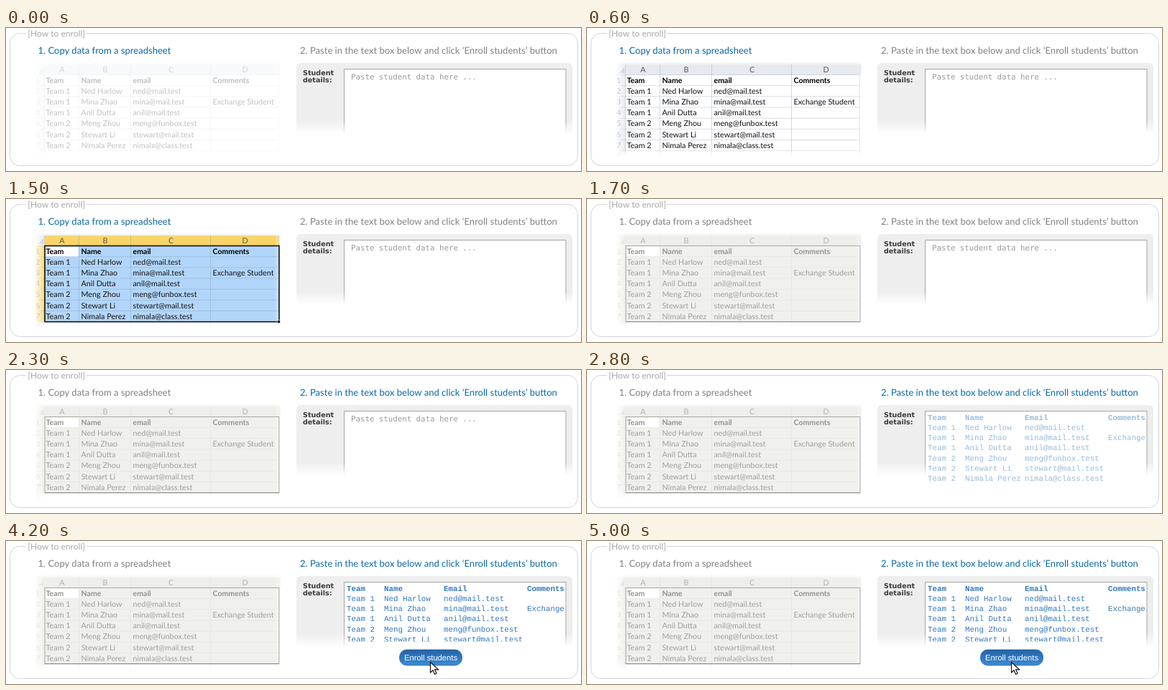
These frames come from a looping animation (800x200 px, 5100 ms). An HTML page:

```html
<!DOCTYPE html>
<html lang="en">
<head>
<meta charset="utf-8">
<title>How to enroll</title>
<style>
html, body { margin: 0; width: 100%; height: 100%; overflow: hidden; background: #fff; }
svg { display: block; width: 100%; height: 100%; }
text { font-family: Lato, Inter, sans-serif; font-size: 10.8px; text-rendering: geometricPrecision; white-space: pre; }
.b { font-weight: bold; font-size: 10.6px; }
.mid { text-anchor: middle; }
.head { font-size: 13.05px; }
.label { font-size: 12.1px; fill: #a8a8a8; }
.side { font: bold 9.6px "DejaVu Sans", sans-serif; fill: #3a3a3a; }
.hint { font: 10.75px "DejaVu Sans Mono", monospace; fill: #9c9c9c; }
.paste text { font: 10.8px "Liberation Mono", monospace; fill: #3477bd; }
.paste .b { font-weight: bold; }
.btn { font: 11.2px "Liberation Sans", Arial, sans-serif; fill: #fff; }
</style>
</head>
<body>
<svg viewBox="0 0 800 200">
  <defs>
    <linearGradient id="fadeX"><stop offset=".01" stop-color="#000"/><stop offset=".055" stop-color="#fff"/><stop offset=".975" stop-color="#fff"/><stop offset="1" stop-color="#888"/></linearGradient>
    <linearGradient id="fadeY" x2="0" y2="1"><stop offset="0" stop-color="#000" stop-opacity="1"/><stop offset=".04" stop-color="#000" stop-opacity="0"/><stop offset=".92" stop-color="#000" stop-opacity="0"/><stop offset="1" stop-color="#000"/></linearGradient>
    <mask id="soft" maskUnits="userSpaceOnUse" x="36" y="47" width="346" height="133">
      <rect x="36" y="47" width="346" height="133" fill="url(#fadeX)"/>
      <rect x="36" y="47" width="346" height="133" fill="url(#fadeY)"/>
    </mask>
    <linearGradient id="fadeP" x2="0" y2="1"><stop offset=".82" stop-color="#fff"/><stop offset="1" stop-color="#000"/></linearGradient>
    <mask id="softP" maskUnits="userSpaceOnUse" x="400" y="45" width="392" height="103">
      <rect x="400" y="45" width="392" height="103" fill="url(#fadeP)"/>
    </mask>
    <linearGradient id="blue" x2="0" y2="1"><stop offset="0" stop-color="#2462a3"/><stop offset=".5" stop-color="#2f78c0"/><stop offset="1" stop-color="#3d8bd2"/></linearGradient>
    <clipPath id="above"><rect x="470" y="50" width="310" height="90.5"/></clipPath>
    <clipPath id="below"><rect x="470" y="140.5" width="310" height="25"/></clipPath>
  </defs>
  <rect x="5.5" y="7.5" width="790" height="185" rx="14" fill="#fff" stroke="#d4d4d4"/>
  <rect x="28" y="4" width="83" height="10" fill="#fff"/>
  <text class="label" x="30.3" y="12.2">[How to enroll]</text>
  <text class="head" id="h1" x="44.5" y="35.5">1. Copy data from a spreadsheet</text>
  <text class="head" id="h2" x="409" y="35.5">2. Paste in the text box below and click ‘Enroll students’ button</text>
  <g id="color"></g>
  <g id="gray"></g>
  <g mask="url(#softP)">
    <rect x="404" y="49" width="384" height="120" rx="6" fill="#eee"/>
    <rect x="470.5" y="57.5" width="308.5" height="120" fill="#fff" stroke="#a4a4a4"/>
  </g>
  <text class="side" x="413" y="66">Student</text>
  <text class="side" x="413" y="76">details:</text>
  <text class="hint" id="hint" x="480" y="72">Paste student data here ...</text>
  <g class="paste" id="paste"></g>
  <g id="button">
    <rect x="547.5" y="152" width="87" height="22" rx="10" fill="url(#blue)" stroke="#2c6cae" stroke-width=".8"/>
    <text class="btn mid" x="591" y="167">Enroll students</text>
  </g>
  <path id="cursor" d="M0 0V14.5L3.5 11.3 6 17 8.6 15.8 6.1 10.4H11Z" fill="#fff" stroke="#111" stroke-width="1.2"/>
</svg>
<script>
const LOOP = 5100, STEP = 100;
const $ = id => document.getElementById(id);
const people = [
  ["Team 1", "Ned Harlow", "ned@mail.test"],
  ["Team 1", "Mina Zhao", "mina@mail.test", "Exchange Student"],
  ["Team 1", "Anil Dutta", "anil@mail.test"],
  ["Team 2", "Meng Zhou", "meng@funbox.test"],
  ["Team 2", "Stewart Li", "stewart@mail.test"],
  ["Team 2", "Nimala Perez", "nimala@class.test"]
];
const sheet = [["Team", "Name", "email", "Comments"], ...people];
const colX = [54, 102, 174, 285, 380];
const top0 = 65.5, rowH = 15.17;
const rowY = r => top0 + r * rowH;

const rect = (x, y, x2, y2, fill, more = "") =>
  `<rect x="${x}" y="${y}" width="${x2 - x}" height="${y2 - y}" fill="${fill}" ${more}/>`;
const text = (x, y, s, cls = "", fill = "") =>
  `<text x="${x}" y="${y}" class="${cls}"${fill && ` fill="${fill}"`}>${s}</text>`;
const line = (x, y, x2, y2, color) =>
  `<path d="M${x} ${y}L${x2} ${y2}" stroke="${color}"/>`;

// Filled range from A1 over the given columns and rows, with its header cells
function range(cols, rows, fill, head) {
  const x = colX[cols], y = rowY(rows);
  return rect(54, 51, x, top0, head) + rect(36, top0, 54, y, head) +
    rect(54, top0, x, y, fill) + rect(55, top0 + 1, 101, rowY(1), "#fff");
}

function border(cols, rows, color, width) {
  return rect(54, top0, colX[cols], rowY(rows), "none", `stroke="${color}" stroke-width="${width}"`);
}

function handle(cols, rows) {
  const x = colX[cols], y = rowY(rows);
  return rect(x - 2.5, y - 2, x + 1.5, y + 2, "#111", 'stroke="#fff" stroke-width=".6"');
}

function cells(c) {
  let s = "";
  colX.forEach(x => s += line(x - .5, 51, x - .5, 180, c.grid));
  for (let r = 0; r < 8; r++) s += line(36, rowY(r), 380, rowY(r), c.grid);
  s += `<path d="M52 55V63H44Z" fill="${c.corner}"/>`;
  [..."ABCD"].forEach((l, i) => s += text((colX[i] + colX[i + 1]) / 2, 62, l, "mid", c.label));
  for (let r = 0; r < 8; r++) s += text(44, rowY(r) + 11.3, r + 1, "mid", c.label);
  sheet.forEach((row, r) => row.forEach((v, i) =>
    s += text(colX[i] + (i ? 2.5 : 1.5), rowY(r) + 11.3, v, r ? "" : "b", r ? c.text : c.bold)));
  return s;
}

const back = head => rect(36, 47, 382, 180, "#fff") + rect(36, 47, 382, top0, head) + rect(36, 47, 54, 180, head);

const picks = [[2, 3], [3, 5], [4, 7]];
$("color").innerHTML = `<g mask="url(#soft)">${back("#e6eaef")}` +
  picks.map(([c, r], i) => `<g id="fill${i}">${range(c, r, "#b2d6fa", "#f9d568")}</g>`).join("") +
  cells({ grid: "rgba(110,130,160,.28)", corner: "#c3c9d0", label: "#555", text: "#111", bold: "#000" }) + "</g>" +
  picks.map(([c, r], i) => `<g id="edge${i}">${border(c, r, "#111", 1.6)}${handle(c, r)}</g>`).join("");
$("gray").innerHTML = `<g mask="url(#soft)">${back("#efefeb")}${range(4, 7, "#f0f0ec", "#eeeeea")}` +
  cells({ grid: "#e8e8e3", corner: "#dededa", label: "#b2b2ae", text: "#9f9f9a", bold: "#93938e" }) + "</g>" +
  border(4, 7, "#a8a8a3", 1) + line(54, rowY(7), 380, rowY(7), "#8c8c88");

const tabs = [474, 526, 609, 725];
const pasted = [["Team", "Name", "Email", "Comments"], ...people].map((row, r) =>
  row.map((v, i) => text(tabs[i], 70 + 14.15 * r, v.split(" Student")[0], r ? "" : "b")).join("")).join("");
$("paste").innerHTML = `<g clip-path="url(#above)">${pasted}</g><g id="spill" clip-path="url(#below)">${pasted}</g>`;

const ramp = (t, a, b) => Math.min(1, Math.max(0, (t - a) / (b - a)));
const ease = p => p * p * (3 - 2 * p);
const mix = (a, b, p) => a + (b - a) * p;
const fade = (id, o) => $(id).setAttribute("opacity", o);
const GREY = [128, 128, 128], BLUE = [8, 104, 168];
const tint = (id, p) => $(id).setAttribute("fill",
  `rgb(${GREY.map((g, i) => Math.round(mix(g, BLUE[i], p)))})`);

function draw(t) {
  const dim = ramp(t, 1500, 1700);
  tint("h1", 1 - dim);
  tint("h2", ramp(t, 1900, 2300));
  fade("color", dim < 1 ? mix(.25, 1, ramp(t, 0, 400)) : 0);
  fade("gray", dim);

  const grow = [ramp(t, 600, 800), ramp(t, 860, 1020), ramp(t, 1060, 1240), 0];
  picks.forEach((_, i) => {
    fade("fill" + i, grow[i]);
    fade("edge" + i, grow[i] * (1 - grow[i + 1]));
  });

  fade("hint", 1 - ramp(t, 2400, 2700));
  fade("paste", ramp(t, 2600, 3000));
  const shown = ramp(t, 3000, 3400);
  fade("spill", 1 - shown);
  fade("button", shown);

  const move = ease(ramp(t, 3500, 4200));
  fade("cursor", ramp(t, 3400, 3600));
  $("cursor").setAttribute("transform", `translate(${mix(596, 590.5, move)} ${mix(191, 169.5, move)})`);
}

const start = performance.now();
function tick() {
  const t = (performance.now() - start) % LOOP;
  draw(Math.floor(t / STEP) * STEP);
  requestAnimationFrame(tick);
}
tick();
</script>
</body>
</html>
```
